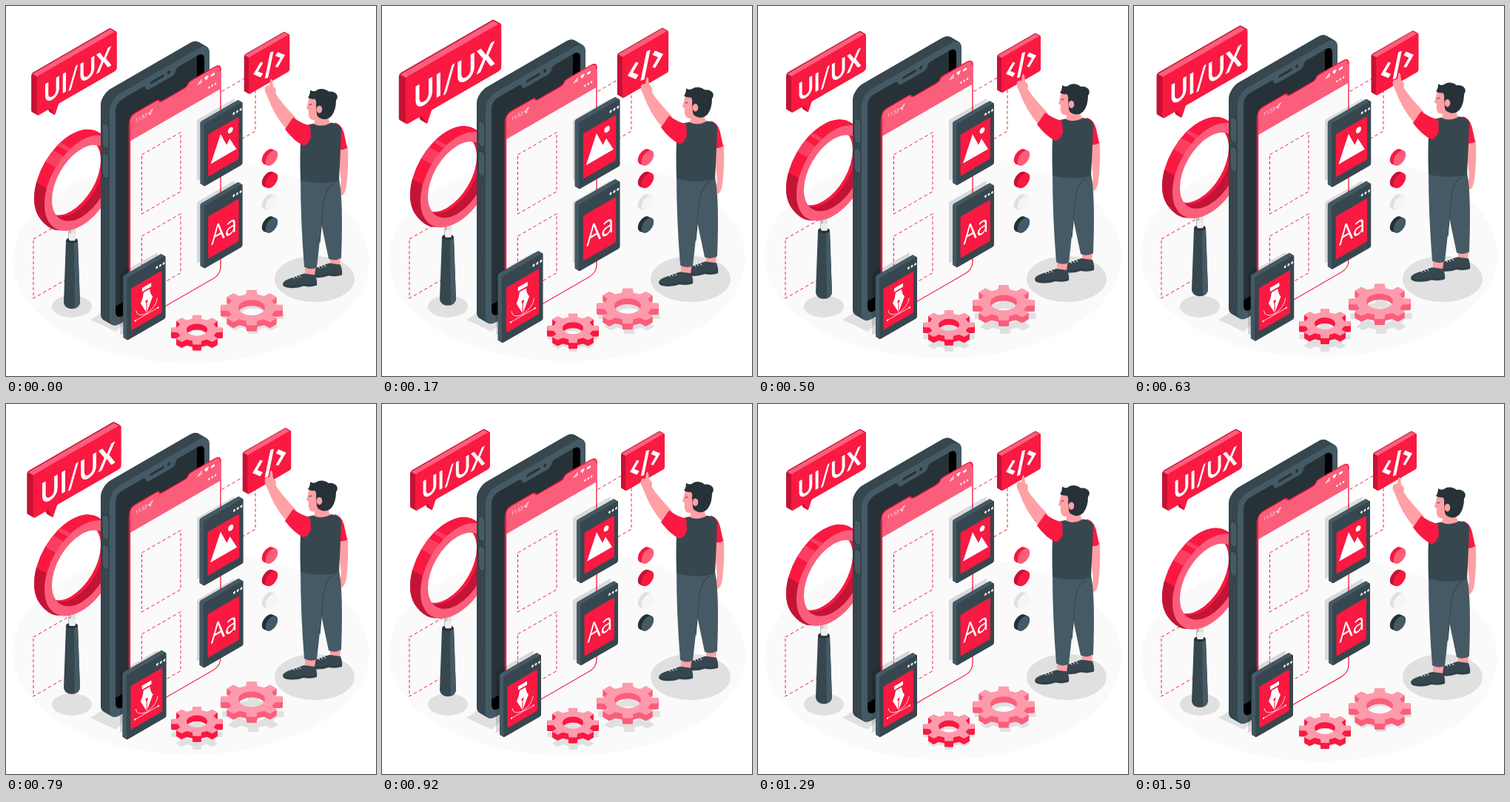
These frames come from a looping animation (500 by 500 pixels, 1.54 s). An HTML page:

```html
<!DOCTYPE html>
<html lang="en">
<head>
<meta charset="utf-8">
<style>
html, body { margin: 0; height: 100%; overflow: hidden; background: #fff; }
svg { display: block; width: 100%; height: 100%; }
text { font-family: "Open Sans", sans-serif; fill: #fff; }
.title { font-family: Lato, sans-serif; font-weight: 700; }
</style>
</head>
<body>
<svg id="stage" viewBox="0 0 500 500"></svg>
<script>
const RED = '#f91941', DEEP = '#c41436', PINK = '#fb5e7b', PALE = '#fd9bac';
const INK = '#263238', DARK = '#37474f', SLATE = '#455a64', GREY = '#e0e0e0', SKIN = '#ffa0a4';
const LOOP = 1540;

const path = (d, fill, more = '') => `<path d="${d}" fill="${fill}" ${more}/>`;
const line = (d, stroke, width = 1, more = '') => path(d, 'none', `stroke="${stroke}" stroke-width="${width}" ${more}`);
const rect = (x, y, w, h, r, fill) => `<rect x="${x}" y="${y}" width="${w}" height="${h}" rx="${r}" fill="${fill}"/>`;
const oval = (x, y, rx, ry, fill) => `<ellipse cx="${x}" cy="${y}" rx="${rx}" ry="${ry}" fill="${fill}"/>`;
const move = (x, y, art) => `<g transform="translate(${x} ${y})">${art}</g>`;
// upright isometric plane, receding to the upper right
const iso = (x, y, art) => `<g transform="translate(${x} ${y}) skewY(-30)">${art}</g>`;
const slab = (dx, dy, art) => {
  const n = Math.ceil(Math.hypot(dx, dy) * 1.5);
  return Array.from({ length: n }, (_, i) => move(dx * (1 - i / n), dy * (1 - i / n), art)).join('');
};
const block = (x, y, w, h, r, face, side, top, dx, dy) =>
  slab(dx, dy, iso(x, y, rect(0, 0, w, h, r, side))) +
  iso(x, y, path(`M${r / 2} ${r / 2}l${dx} ${dy + dx * .577}H${w + dx - r / 2}L${w - r / 2} ${r / 2}Z`, top) + rect(0, 0, w, h, r, face));
const label = (x, y, size, str, style = '') =>
  `<text class="${style}" transform="translate(${x} ${y}) scale(.866 1)" font-size="${size}">${str}</text>`;
const lift = (height, art) => `<g data-lift="${height}">${art}</g>`;
const pulse = (amount, x, y, art) => `<g data-pulse="${amount}" style="transform-origin:${x}px ${y}px">${art}</g>`;
const dashes = (x, y) => iso(x, y, line('M0 0H52.5V80H0Z', RED, 1, 'stroke-dasharray="4 3"'));
const dots = (x, y, gap, r) => [0, 1, 2].map(i => oval(x + i * gap, y, r, r * 1.15, '#fff')).join('');

function gearPath(radius, teeth, hole) {
  const points = [];
  for (let i = 0; i < teeth; i++) {
    for (const [at, r] of [[-.3, .76], [-.2, 1], [.2, 1], [.3, .76]]) {
      const a = (i + at) / teeth * 2 * Math.PI;
      points.push(`${(radius * r * Math.cos(a)).toFixed(1)} ${(radius * r * Math.sin(a) * .577).toFixed(1)}`);
    }
  }
  return `M${points.join('L')}ZM${-hole} 0a${hole} ${hole * .577} 0 1 0 ${2 * hole} 0a${hole} ${hole * .577} 0 1 0 ${-2 * hole} 0Z`;
}
const bigGear = gearPath(42, 8, 18), smallGear = gearPath(35, 8, 14);
const flat = (d, fill) => path(d, fill, 'fill-rule="evenodd"');
const gear = (x, y, d, side) => move(x, y, slab(0, 8, flat(d, side)) + flat(d, PALE));

const card = (x, y, icon) => iso(x - 10, y - 6, rect(0, 0, 51, 83, 2, '#0002')) +
  pulse(.11, x + 23, y + 27, block(x, y, 51, 83, 2, DARK, SLATE, SLATE, -5, -3) +
    iso(x, y, dots(39.5, 9, 4.5, 1.4) + rect(5.5, 17, 40.5, 56, 2, RED) + icon));

const chip = (y, face, side) => {
  const disc = fill => iso(359, y + 1.5, oval(0, 0, 8.3, 8.9, fill));
  return slab(-5, -2, disc(side)) + disc(face);
};

function magnifier() {
  const ring = fill => iso(102, 240, flat('M-50 0a50 57.7 0 1 0 100 0a50 57.7 0 1 0-100 0ZM-40 0a40 46 0 1 0 80 0a40 46 0 1 0-80 0Z', fill));
  return `<clipPath id="hole"><ellipse rx="40" ry="46" transform="translate(102 240) skewY(-30)"/></clipPath>` +
    rect(84, 296, 10, 24, 2, GREY) + rect(84, 296, 4, 24, 2, '#bdbdbd') +
    slab(-14, -8, ring(RED)) +
    path('M38 261Q38 250 41 239L55 247Q49 270 58 290Q64 301 74 304Q62 305 52 295Q38 282 38 261Z', DEEP) +
    path('M53 211L64 196 78 204 67 219ZM69 189L73 185 87 193 83 197Z', PINK, 'opacity=".55"') +
    `<g clip-path="url(#hole)">${slab(-10, -6, ring(DEEP))}</g>` + ring(PINK) +
    path('M81 318Q89 322 97 318L100 402Q98 410 89 410Q80 410 78 402Z', DARK) +
    path('M92 320L97 318 100 402Q98 408 93 409Z', SLATE) + oval(89, 317.5, 8, 3.6, INK) +
    rect(85, 308, 9, 10, 2, '#eee');
}

function phone() {
  const body = fill => iso(140, 127, rect(0, 0, 135, 311, 14, fill));
  const top = 'M0 9Q0 0 8 0H36q3 0 4 2.5t5 2.500H74q4 0 5-2.500t4-2.500H115Q123 0 123 9';
  const button = y => path(`M130 ${y + 2}q3-4 8 1q1 1 1 4v23q0 5-4 4q-5-3-5-7z`, SLATE, `stroke="${INK}" stroke-width=".8"`);
  return slab(-12, -7, body(DARK)) + body(SLATE) + button(159) + button(199) +
    iso(140, 127, path('M8 20Q8 9 18 9H45q3 0 4 4t6 4H84q4 0 5-4t4-4H119Q128 9 128 20V290Q128 302 118 302H18Q8 302 8 290Z', INK) +
      path('M118 9Q128 9 128 20V40H118ZM8 284H18V302Q8 302 8 290Z', '#000') +
      rect(55, 8, 19, 3.4, 1.7, INK) + oval(80, 9.5, 2, 2.3, INK)) +
    iso(167, 149.5,
      path(`${top}V274Q123 284.5 113 284.5H8Q0 284.5 0 276Z`, '#fafafa', `stroke="${RED}" stroke-width="1.3"`) +
      path(`${top}V34H0Z`, PINK) + line(top, RED, 1.3) + line('M0 9V280', RED, 2.4) +
      label(8, 13.5, 7, '11:53') + line('M25 11L31 8 28 14 27.500 11.500Z', '#fff', .8) +
      path('M92 11h1.300v-2h-1.300zM94 11h1.300v-3.500h-1.300zM96 11h1.300v-5h-1.300zM101 7q3-3 6 0l-3 4z', '#fff') +
      rect(110, 7, 5, 3, .8, '#fff') + dots(107.5, 23, 4.3, 1.2));
}

function man() {
  const shoe = path('M374 376Q375 371 386 368Q396 364 403 362L418 364Q421 372 420 378Q412 381 402 379Q392 383 380 381Q374 380 374 376Z', DARK) +
    line('M375 378Q384 381 402 377Q412 379 420 376', INK, .8) + line('M387 365l3 4M391 364l3 4M395 363l3 4', '#fff', 1);
  const ankle = path('M404 350H419L417 365Q410 369 404 364Z', SKIN);
  return path('M450 190L462 190Q463 220 460 244Q458 256 453 257Q450 250 453 240Q450 215 450 190Z', SKIN) +
    path('M444 158Q455 160 458 178L461 192Q456 196 449 194Z', RED) +
    move(34, -14, ankle + shoe) +
    path('M424 238L450 234Q456 262 453 341Q444 346 436 342L424 285Z', SLATE) + ankle + shoe +
    path('M398 233L444 236Q431 246 428 275Q424 320 420 354Q411 358 403 353Q398 290 398 233Z', SLATE) +
    line('M444 240Q430 245 428 275L424 320', DARK, 1.2) +
    path('M353 122L363 116Q368 127 392 152L379 167Q362 148 353 122Z', SKIN) +
    path('M350 116Q348 107 356 108L357 101Q358 97 360 101L361 109Q367 113 364 119L354 124Z', SKIN) +
    path('M417 144L436 145 436 158Q426 164 417 158Z', SKIN) +
    path('M408 161Q420 158 436 158Q449 158 453 166Q452 200 450 237Q424 243 398 236Q397 205 398 185Z', DARK) +
    path('M388 151Q400 160 411 162L412 178Q408 189 402 189Q390 184 377 167Z', RED) +
    path('M418 155Q427 160 436 154L438 159Q426 165 416 160Z', SKIN) +
    path('M410 123Q408 131 406 139L409 141Q408 149 411 153Q416 156 423 153L431 148 430 122Z', SKIN) +
    path('M408 124Q411 121 411 114Q416 118 422 113Q430 111 436 116Q443 115 447 120Q449 124 446 128Q446 141 440 149Q434 155 427 153Q420 151 420 146L419 134Q420 128 417 126Q412 127 408 124Z', INK) +
    oval(423.5, 140, 3.8, 5.2, SKIN) + line('M410 134l3-1', INK, 1);
}

const mountain = path('M9 58L22 26 30 45 34 39 43 58Z', '#fff') + oval(35, 28.5, 3.4, 3.8, '#fff');
const letters = label(9.5, 57.5, 33, 'Aa');
const nib = move(0, -6, rect(20, 31, 12, 5, .5, '#fff') + path('M22 38H30Q31 46 34 50L26 67 18 50Q21 46 22 38Z', '#fff') +
  line('M26 66V53', RED, 1) + oval(26, 52, 1.6, 1.8, RED) +
  line('M12 56Q13 66 26 68Q39 66 40 56M11 69H41', '#fff', .7) + oval(11, 69, 1.1, 1.2, '#fff') + oval(41, 69, 1.1, 1.2, '#fff'));

const banner = pulse(.34, 92, 88.5,
  slab(-7, -4, path('M61 130L74 125 68 144Z', DEEP)) + block(45, 95, 101, 50, 3, RED, DEEP, PINK, -7, -4) +
  path('M60 132L74 125 68 143Z', RED) + iso(45, 95, label(8.5, 40, 34, 'UI/UX', 'title')));
const code = pulse(.21, 352.5, 77, block(329, 70, 53, 48, 2, RED, DEEP, PINK, -6, -3.5) +
  iso(329, 70, line('M17 16L9 25 17 33M30 10L23 40M36 16L44 24 36 33', '#fff', 4.4)));

const stage = document.getElementById('stage');
stage.innerHTML = [
  lift(10, oval(250, 345, 241, 138, '#fafafa')),
  oval(89, 406, 27, 15, GREY), oval(417, 369, 54, 31, GREY),
  path('M114 424L135 411 165 425 148 440Z', GREY),
  move(334, 419, flat(bigGear, GREY)), move(258, 447, flat(smallGear, GREY)),
  dashes(37, 315), dashes(284.5, 119.5),
  lift(20, magnifier()), lift(10, phone()),
  dashes(183.5, 201), dashes(183.5, 311),
  chip(204, PINK, RED), chip(234.5, RED, DEEP), chip(265, '#f5f5f5', GREY), chip(295, SLATE, INK),
  card(268, 160, mountain), card(268, 271, letters), card(164, 368, nib),
  lift(10, gear(332, 408, bigGear, PINK) + gear(258, 438, smallGear, RED)),
  banner, code, lift(10, man())
].join('');

const lifted = stage.querySelectorAll('[data-lift]'), pulsing = stage.querySelectorAll('[data-pulse]');

function draw(now) {
  const p = Math.min(1, (now % LOOP + 30) / 1500);
  const rise = 1 - Math.abs(2 * p - 1);
  // double heartbeat: peaks at 10% and 50%
  const beat = Math.max(0, Math.min(p / .1, (.3 - p) / .2), Math.min((p - .4) / .1, (.6 - p) / .1));
  for (const el of lifted) el.setAttribute('transform', `translate(0 ${-el.dataset.lift * rise})`);
  for (const el of pulsing) el.style.transform = `scale(${1 + el.dataset.pulse * beat})`;
  requestAnimationFrame(draw);
}
draw(0);
</script>
</body>
</html>
```
